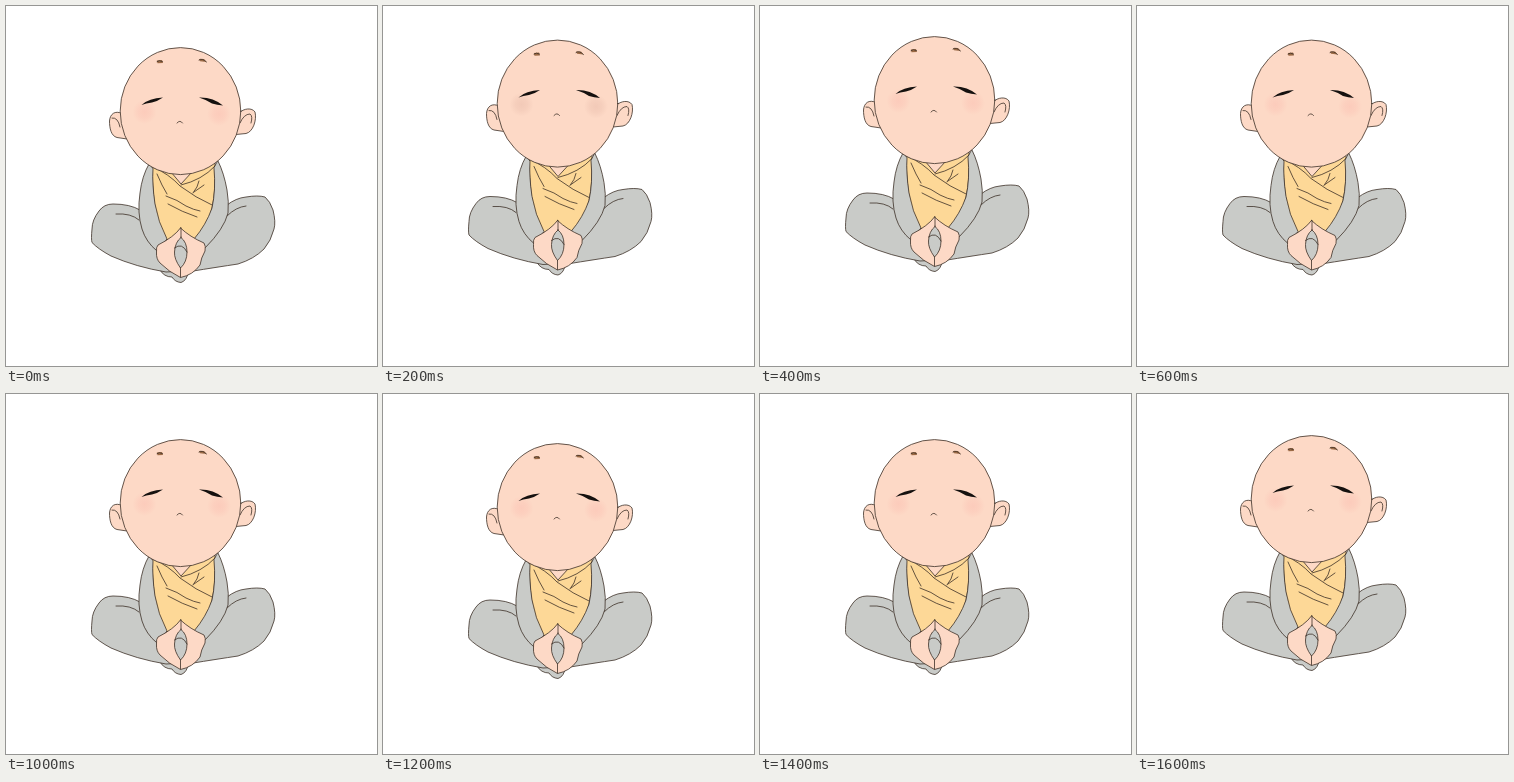
These frames come from a looping animation (371x360 px, 1800 ms). An HTML page:

```html
<!DOCTYPE html>
<html lang="en">
<head>
<meta charset="utf-8">
<title>Meditating child</title>
<style>
  html, body { margin: 0; width: 100%; height: 100%; overflow: hidden; background: #fff; }
  svg { display: block; width: 100vw; height: 100vh; }
  .line { fill: none; }
  .skin { fill: #fdd9c6; }
  .cloth { fill: #c9cbc8; }
  .robe { fill: #fdd897; }
</style>
</head>
<body>
<svg viewBox="0 0 371 360">
  <defs>
    <radialGradient id="blush">
      <stop class="tint" offset="0" stop-opacity=".9"/>
      <stop class="tint" offset=".5" stop-opacity=".6"/>
      <stop class="tint" offset="1" stop-opacity="0"/>
    </radialGradient>
  </defs>
  <g id="figure" stroke="#3d3028" stroke-width=".8" stroke-linejoin="round" stroke-linecap="round">
    <!-- legs and feet -->
    <path class="cloth" d="M154 264Q158 271 166 271Q169 276 175 276.500Q181 275 183 264Z"/>
    <path class="cloth" d="M134 204Q124 198 107 198Q98 198 93 205Q86 214 86 223Q85 233 86 236.500Q92 243 105 250Q130 261 160 266L180 265L172 212Z"/>
    <path class="cloth" d="M221 199Q230 192 240 191Q252 189 259 191Q264 195 267 204Q270 216 268 223Q265 235 258 243Q248 253 232 258Q212 261 184 265.500L172 262L178 212Z"/>
    <path class="line" d="M110 208Q125 207 133 214M221 210Q230 201 240 200"/>

    <!-- robe -->
    <path class="robe" d="M146 157L209 157Q210 185 206 202Q202 220 196 234L158 234Q150 212 148 194Q146 175 146 157Z"/>
    <path class="skin" d="M165 166L175 178L186 166Z"/>
    <path class="line" d="M147 161Q163 168 174 180Q190 192 206 199M209 160Q196 174 175 179M151 168Q156 180 161 188M160 190Q172 194 180 200Q188 204 194 205M162 198Q176 206 191 211M187 187Q192 181 193 175M188 186L198 179"/>

    <!-- sleeves -->
    <path class="cloth" d="M143 158Q136 170 134 187Q131 207 136 223Q140 236 151 245L161 233Q152 216 149 198Q146 178 147 163Z"/>
    <path class="cloth" d="M212 155Q218 167 221 184Q223 195 222 207Q218 223 199 242L188 233Q200 219 206 202Q210 184 208 162Z"/>

    <!-- hands -->
    <path class="skin" d="M174.500 222Q168 231 152 239Q150 241 150.500 246Q150 253 154 257Q163 266 174.500 271.500Q187 269 194 259Q195 252 199 245Q200 240 198 237Q184 231 174.500 222Z"/>
    <path class="cloth" d="M175 231.500Q169 236 168.500 246Q168 253 174.500 262Q181 256 181 246Q181 236 175 231.500Z"/>
    <path class="line" d="M168.500 242Q176 236 181 246M175 222V231.500M174.500 262V271"/>

    <!-- ears and head -->
    <path class="skin" d="M116 107.500C109 104 104 108 103.500 115C103.500 122 105 130 111 131.500L121 133Z"/>
    <path class="skin" d="M233 107C238 102 246 101.500 249 106C251 114 247 126 240 127.500L230 128.500Z"/>
    <path class="line" d="M106 112Q112 111 114 121M234 117Q238 108 244 108Q247 110 245 117"/>
    <ellipse class="skin" cx="174.500" cy="105.100" rx="60.300" ry="63.500"/>

    <!-- face -->
    <g stroke="none">
      <circle cx="138.500" cy="106" r="12" fill="url(#blush)"/>
      <circle cx="213" cy="108" r="12" fill="url(#blush)"/>
      <path fill="#15110f" d="M135.500 99Q143 92 157 91.500Q152 95 146 96.500Q140 97 135.500 99Z"/>
      <path fill="#15110f" d="M193 91.500Q207 91 217 99.500Q211 99 206 97.500Q201 94 193 91.500Z"/>
      <path fill="#9b6a45" d="M150.800 54.500L156 54L157 57L151.500 57.200Z"/>
      <path fill="#9b6a45" d="M193 53L198 53L200.500 56L194 55.200Z"/>
    </g>
    <path class="line" d="M151 55.500Q153 53.500 156.500 55.500M193 54Q196 51.500 200.500 56M171 117Q174 113.500 176.500 117"/>
  </g>
</svg>
<script>
  const STEP = 200;
  const lift = [0, -7.5, -11, -7.5, -2, 4, 8, 4, 0];
  const figure = document.getElementById('figure');
  const tints = document.querySelectorAll('.tint');
  const start = performance.now();

  function draw(now) {
    const i = Math.floor(Math.max(0, now - start) / STEP) % lift.length;
    figure.setAttribute('transform', `translate(0 ${lift[i]})`);
    const color = i === 1 ? '#f1c8b6' : '#fccaba';
    tints.forEach(t => t.setAttribute('stop-color', color));
    requestAnimationFrame(draw);
  }
  draw(start);
</script>
</body>
</html>
```
